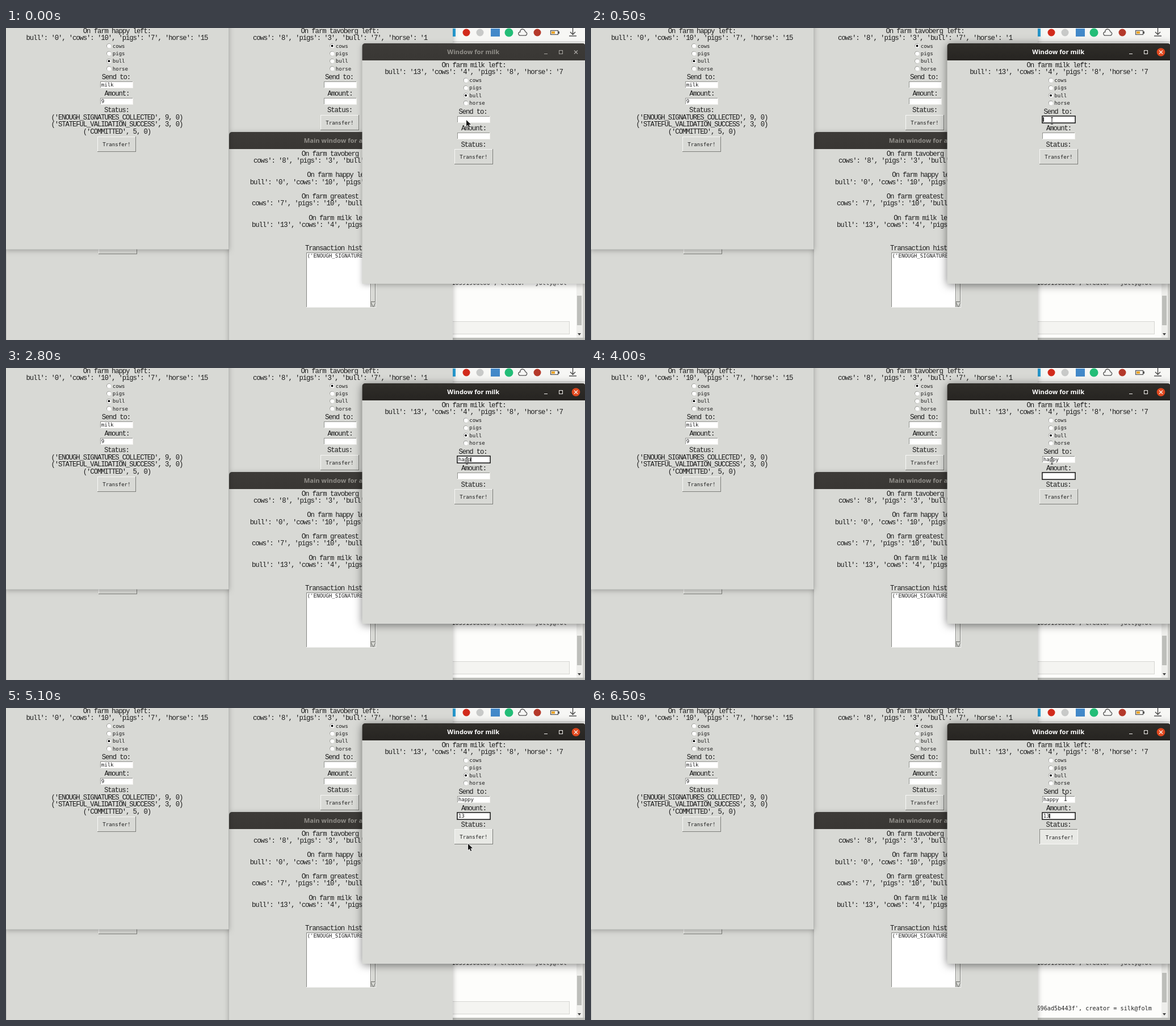
An HTML page with a canvas that plays this animation: 1020x549 px, repeating every 8000 ms.

```html
<!DOCTYPE html>
<html lang="en">
<head>
<meta charset="utf-8">
<title>Farm transfer</title>
<style>
html, body { margin: 0; width: 100%; height: 100%; overflow: hidden; background: #d8d9d5; }
canvas { display: block; }
</style>
</head>
<body>
<canvas id="stage" width="1020" height="549"></canvas>
<script>
const c = document.getElementById('stage').getContext('2d');
const FACE = '#d8d9d5', INK = '#1c1c1c', CELL = 6.27, SMALL_CELL = 5.48, LINE = 12.6, BAR = 30;
const SMALL = '9.1px "DejaVu Sans Mono", monospace';
const LABEL = '12.3px "Liberation Mono", monospace';
const TERM = '10.2px "DejaVu Sans Mono", monospace';

const STOCK = {
  happy: "bull': '0', 'cows': '10', 'pigs': '7', 'horse': '15",
  tavoberg: "cows': '8', 'pigs': '3', 'bull': '7', 'horse': '1",
  greatest: "cows': '7', 'pigs': '10', 'bull': '0', 'horse': '1",
  milk: "bull': '13', 'cows': '4', 'pigs': '8', 'horse': '7"
};

// Step tracks: [start time, value...]
const SEND = [[0, 0], [2100, 1], [2200, 2], [2600, 3], [2800, 4], [3000, 5]];
const AMOUNT = [[0, 0], [4100, 1], [4500, 2]];
const FOCUS = [[0, ''], [500, 'send'], [3400, 'amount']];
const CARET = [[0, 0], [500, 1], [1100, 0], [1400, 1], [2100, 0], [2300, 1], [2900, 0],
  [3200, 1], [4000, 0], [4300, 1], [4900, 0], [5200, 1]];
const BUTTON = [[0, ''], [4900, 'hover'], [5700, 'down']];
const POINTER = [[0, 'arrow', 811, 162], [200, 'beam', 812, 163], [4800, 'arrow', 814, 173],
  [4900, 'arrow', 812, 227], [5100, 'arrow', 814, 239], [5200, 'arrow', 819, 236],
  [5500, 'arrow', 823, 224], [6300, 'arrow', 829, 198], [6400, 'beam', 834, 171], [6500, 'beam', 836, 157]];

const step = (track, t) => track.findLast(k => k[0] <= t);
const at = (track, t) => step(track, t)[1];

function rect(x, y, w, h, color) {
  c.fillStyle = color;
  c.fillRect(x, y, w, h);
}

function disc(x, y, r, color) {
  c.fillStyle = color;
  c.beginPath();
  c.arc(x, y, r, 0, 7);
  c.fill();
}

function path(points, color, width = 1) {
  c.strokeStyle = color;
  c.lineWidth = width;
  c.beginPath();
  points.forEach(([x, y]) => c.lineTo(x, y));
  c.stroke();
}

function text(s, x, y, font, color = INK) {
  c.font = font;
  c.fillStyle = color;
  c.fillText(s, x, y);
}

function label(s, cx, y) {
  c.letterSpacing = '-1.11px';
  text(s, cx - s.length * CELL / 2, y + 4, LABEL);
  c.letterSpacing = '0px';
}

function relief(x, y, w, h, fill, topLeft, bottomRight) {
  rect(x, y, w, h, bottomRight);
  rect(x, y, w - 1, h - 1, topLeft);
  rect(x + 1, y + 1, w - 2, h - 2, fill);
}

function windowFrame(x, y, w, h, title, active) {
  c.save();
  c.shadowColor = active ? 'rgba(0,0,0,.5)' : 'rgba(0,0,0,.28)';
  c.shadowBlur = active ? 15 : 10;
  c.shadowOffsetY = 2;
  c.fillStyle = FACE;
  c.beginPath();
  c.roundRect(x, y, w, h, [6, 6, 0, 0]);
  c.fill();
  c.restore();
  const bar = c.createLinearGradient(0, y, 0, y + BAR);
  bar.addColorStop(0, active ? '#302e2a' : '#3d3b38');
  bar.addColorStop(1, active ? '#262421' : '#393734');
  c.fillStyle = bar;
  c.beginPath();
  c.roundRect(x, y, w, BAR, [5, 5, 0, 0]);
  c.fill();
  c.textAlign = 'center';
  text(title, x + w / 2 - 1, y + 19.3, 'bold 11.2px "Open Sans", sans-serif', active ? '#fff' : '#918f8a');
  c.textAlign = 'left';
}

function titleButtons(active) {
  const color = active ? '#f4f2ee' : '#aaa8a3';
  path([[948, 45.5], [954, 45.5]], color);
  c.strokeRect(974.5, 39.5, 6, 6);
  if (active) disc(1004, 42.5, 7.3, '#e2491f');
  path([[1001, 39.5], [1007, 45.5]], color, 1.2);
  path([[1007, 39.5], [1001, 45.5]], color, 1.2);
}

function entry(x, y, value, focused, caret) {
  if (focused) {
    rect(x - .8, y - .8, 59.6, 13.6, '#111');
    rect(x + .7, y + .7, 56.6, 10.6, '#fff');
  } else {
    relief(x, y, 58, 12, '#fff', '#92938f', '#f0f0ed');
  }
  text(value, x + 1.7, y + 9, SMALL);
  if (focused && caret) rect(x + 1.3 + value.length * SMALL_CELL, y + 2, 1.5, 8, '#000');
}

function button(x, y, state = '') {
  const down = state === 'down', shift = down ? 1.5 : 0;
  relief(x, y, 68, 27, state ? '#e8e9e5' : FACE, down ? '#858682' : '#f8f8f6', down ? '#f8f8f6' : '#7c7d79');
  text('Transfer!', x + 9.3 + shift, y + 16.7 + shift, SMALL);
}

function radio(x, y, name, on) {
  disc(x, y, 4.2, '#8c8d89');
  disc(x + .4, y + .4, 3.8, '#f3f3f1');
  disc(x, y, 3.2, '#fff');
  if (on) disc(x, y, 1.9, '#000');
  text(name, x + 6.3, y + 3, SMALL);
}

function farmForm(name, cx, y, o) {
  label(`On farm ${name} left:`, cx, y);
  label(STOCK[name], cx, y + 12.3);
  ['cows', 'pigs', 'bull', 'horse'].forEach((animal, i) =>
    radio(cx - 14, y + 27 + i * 13.35, animal, animal === o.pick));
  const x = Math.round(cx - 29), top = Math.floor(y);
  label('Send to:', cx - 1.5, y + 81.5);
  entry(x, top + 90, o.send || '', o.focus === 'send', o.caret);
  label('Amount:', cx, y + 110.5);
  entry(x, top + 119, o.amount || '', o.focus === 'amount', o.caret);
  label('Status:', cx - .5, y + 139.5);
  const lines = o.status || [];
  lines.forEach((s, i) => label(s, cx, y + 152 + i * LINE));
  button(Math.floor(cx - 34), Math.round(y + 148.3 + lines.length * LINE), o.button);
}

function tray() {
  rect(787, 0, 233, 24, '#f7f7f5');
  rect(787, 24, 233, 1, '#c8c8c4');
  rect(780, 1, 12, 14, '#29a3dc');
  disc(811, 8, 6.5, '#d22b1c');
  disc(835, 8, 6.5, '#c8c9c8');
  rect(854, 1, 16, 14, '#4389c9');
  disc(886, 8, 7.5, '#23bd77');
  disc(936, 8, 6.5, '#b5392a');
  c.strokeStyle = '#555';
  c.lineWidth = 1.3;
  c.beginPath();
  c.arc(906, 10, 3.2, 1.6, 4.7);
  c.arc(910, 6.5, 4.5, 3.3, 6);
  c.arc(914.5, 10, 3.2, 4.9, 1.6);
  c.closePath();
  c.stroke();
  c.strokeRect(959.5, 4.5, 13, 7);
  rect(961, 6, 6, 4, '#eda629');
  rect(973, 6, 2, 4, '#555');
  path([[998.5, 0], [998.5, 11]], '#444', 1.4);
  path([[994, 7], [998.5, 11.5], [1003, 7]], '#444', 1.4);
  path([[992, 14], [1005, 14]], '#444', 1.4);
}

function terminal(updated) {
  rect(787, 25, 233, 524, '#fdfdfb');
  text("1839190dc80', creator = jolly@fol", 785.4, 452, TERM, '#333');
  if (updated) {
    text("696ad5b443f', creator = silk@folm", 785.4, 532, TERM, '#222');
  } else {
    relief(700, 516, 293, 23, '#f4f4f1', '#d5d5d2', '#d5d5d2');
  }
  rect(1005, 440, 11, 105, '#eeeeeb');
  rect(1006, updated ? 466 : 471, 8, 52, '#bdbeba');
  c.fillStyle = '#444';
  c.beginPath();
  c.moveTo(1007, 537);
  c.lineTo(1013, 537);
  c.lineTo(1010, 541);
  c.fill();
  rect(1016, 440, 4, 109, '#d0d0cc');
  rect(787, 545, 233, 4, '#bcbdb9');
}

function mainWindow() {
  windowFrame(393, 183, 394, 400, 'Main window for agent', false);
  ['tavoberg', 'happy', 'greatest', 'milk'].forEach((name, i) => {
    const y = 220.5 + i * 37.7;
    label(`On farm ${name} left:`, 589.7, y);
    label(STOCK[name], 589.7, y + 12.4);
  });
  label('Transaction history:', 589.7, 387);
  relief(529, 395, 113, 97, '#fff', '#858682', '#f4f4f2');
  text("('ENOUGH_SIGNATURE", 530.5, 404, SMALL);
  relief(642, 395, 10, 97, '#b9bab6', '#858682', '#f4f4f2');
  relief(643, 396, 8, 86, FACE, '#f8f8f6', '#7c7d79');
  c.fillStyle = FACE;
  c.beginPath();
  c.moveTo(643, 483);
  c.lineTo(651, 483);
  c.lineTo(647, 491);
  c.fill();
  path([[643, 483], [647, 491], [651, 483]], '#777874');
}

function pointer(kind, x, y) {
  c.save();
  c.translate(x, y);
  if (kind === 'beam') {
    const stem = [[0, -5], [0, 6]], top = [[-2, -5.5], [2, -5.5]], foot = [[-2, 6], [2, 6]];
    [stem, top, foot].forEach(p => path(p, 'rgba(255,255,255,.7)', 2));
    [stem, top, foot].forEach(p => path(p, '#222', 1.1));
  } else {
    c.beginPath();
    [[0, 0], [0, 11], [2.6, 8.7], [4.4, 12.8], [6.3, 12], [4.5, 8], [8, 7.8]].forEach(p => c.lineTo(...p));
    c.closePath();
    c.strokeStyle = 'rgba(255,255,255,.8)';
    c.lineWidth = 1.4;
    c.stroke();
    c.fillStyle = '#161616';
    c.fill();
  }
  c.restore();
}

function draw(t) {
  rect(0, 0, 1020, 549, FACE);
  terminal(t >= 6400);
  tray();

  rect(0, 380, 1, 169, '#bdbebb');
  button(163, 371);
  windowFrame(393, -33, 394, 422, '', false);
  farmForm('tavoberg', 588.5, 4.5, { pick: 'cows' });
  mainWindow();

  windowFrame(-1, -33, 393.5, 422.5, '', false);
  farmForm('happy', 195.4, 4.5, {
    pick: 'bull', send: 'milk', amount: '9',
    status: ["('ENOUGH_SIGNATURES_COLLECTED', 9, 0)", "('STATEFUL_VALIDATION_SUCCESS', 3, 0)", "('COMMITTED', 5, 0)"]
  });

  const active = t >= 500;
  windowFrame(627.5, 27, 393.5, 423, 'Window for milk', active);
  titleButtons(active);
  farmForm('milk', 824, 65, {
    pick: 'bull',
    send: 'happy'.slice(0, at(SEND, t)),
    amount: '13'.slice(0, at(AMOUNT, t)),
    focus: at(FOCUS, t), caret: at(CARET, t), button: at(BUTTON, t)
  });
  pointer(...step(POINTER, t).slice(1));
}

function frame() {
  draw(performance.now() % 8000);
  requestAnimationFrame(frame);
}
frame();
</script>
</body>
</html>
```
